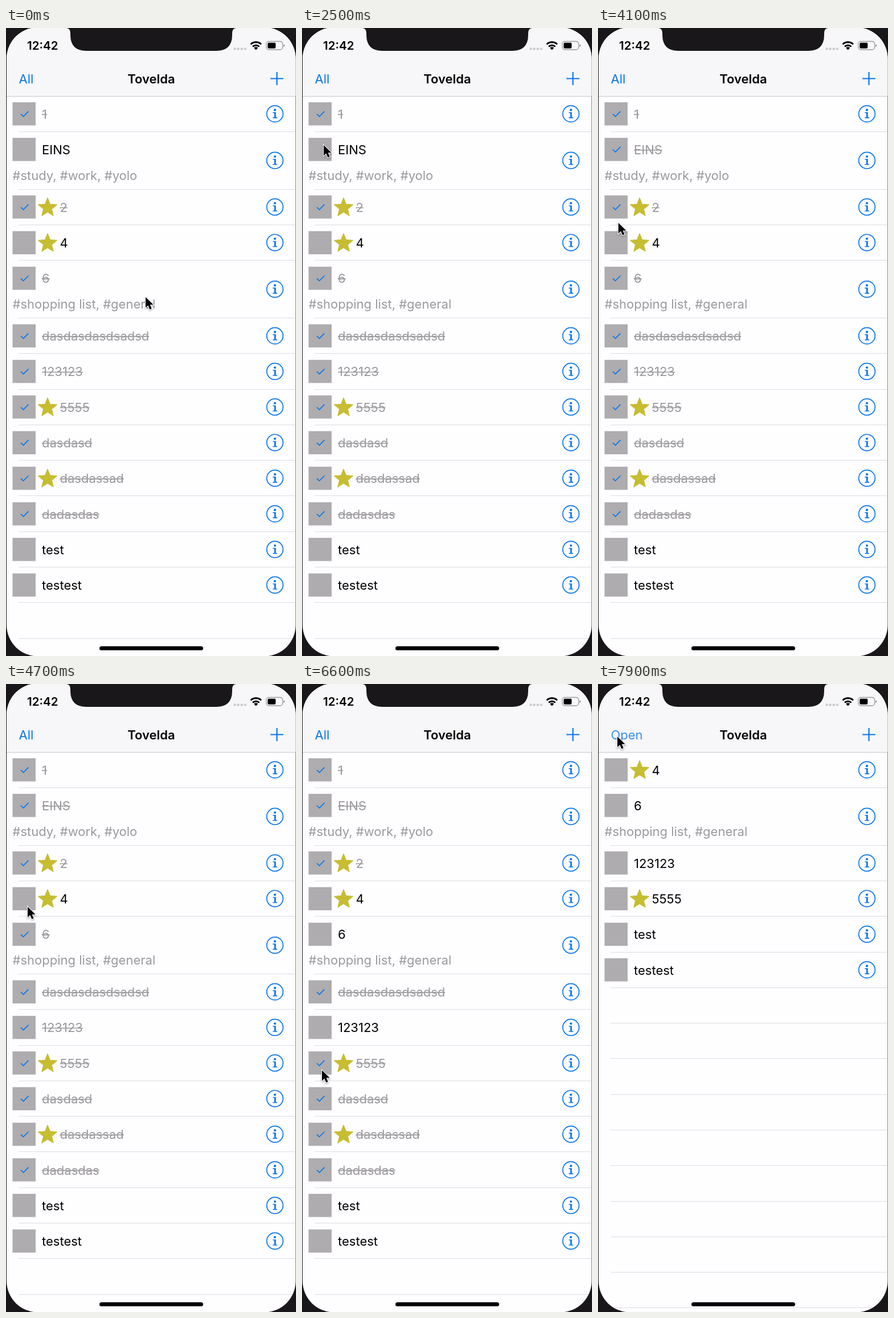
These frames come from a looping animation (509 by 1099 pixels, 8000 ms). An HTML page with a canvas:

```html
<!DOCTYPE html>
<html lang="en">
<head>
<meta charset="utf-8">
<title>To-do list</title>
<style>
html, body { margin: 0; width: 100%; height: 100%; overflow: hidden; background: #19171a; }
canvas { display: block; }
</style>
</head>
<body>
<canvas id="stage" width="509" height="1099"></canvas>
<script>
const ctx = document.getElementById('stage').getContext('2d');
const LOOP = 8000, STEP = 100, FILTER_AT = 7700;
const BLUE = '#0a77ea', GREY = '#9b999c', DARK = '#19171a', LINE = '#dedde0';
const ROW = 62.3, TAGGED_ROW = 100.8, LIST_TOP = 119;

// "toggle" is the moment when the row's check box is tapped.
const items = [
  { text: '1', done: true },
  { text: 'EINS', tags: '#study, #work, #yolo', toggle: 2800 },
  { text: '2', done: true, star: true },
  { text: '4', star: true },
  { text: '6', done: true, tags: '#shopping list, #general', toggle: 5400 },
  { text: 'dasdasdasdsadsd', done: true },
  { text: '123123', done: true, toggle: 6100 },
  { text: '5555', done: true, star: true, toggle: 6700 },
  { text: 'dasdasd', done: true },
  { text: 'dasdassad', done: true, star: true },
  { text: 'dadasdas', done: true },
  { text: 'test' },
  { text: 'testest' }
];

// Pointer stops: time, x, y
const stops = [
  [0, 244, 469], [200, 244, 469], [1200, 95, 207], [1700, 95, 207], [2300, 37, 203],
  [2900, 37, 203], [3400, 34, 322], [3900, 34, 322], [4500, 37, 388], [4700, 37, 388],
  [5200, 35, 447], [5500, 35, 447], [6000, 34, 612], [6200, 34, 612], [6500, 34, 674],
  [6800, 34, 674], [7400, 33, 90], [8000, 33, 90]
];

function pointerAt(t) {
  const i = stops.findIndex(s => s[0] > t);
  const [t0, x0, y0] = stops[i - 1], [t1, x1, y1] = stops[i];
  const p = (t - t0) / (t1 - t0), e = p * p * (3 - 2 * p);
  return [x0 + (x1 - x0) * e, y0 + (y1 - y0) * e];
}

function label(text, x, y, color, { size = 22, weight = 400, align = 'left' } = {}) {
  ctx.font = `${weight} ${size}px Inter, sans-serif`;
  ctx.textAlign = align;
  ctx.fillStyle = color;
  ctx.fillText(text, x, y);
  return ctx.measureText(text).width;
}

function box(x, y, w, h, color, radius = 0) {
  ctx.fillStyle = color;
  ctx.beginPath();
  ctx.roundRect(x, y, w, h, radius);
  ctx.fill();
}

function disc(x, y, r, color) {
  box(x - r, y - r, 2 * r, 2 * r, color, r);
}

function stroke(path, color, width) {
  ctx.strokeStyle = color;
  ctx.lineWidth = width;
  ctx.stroke(new Path2D(path));
}

function fill(path, color) {
  ctx.fillStyle = color;
  ctx.fill(new Path2D(path));
}

function star(x, y) {
  ctx.beginPath();
  for (let i = 0; i < 10; i++) {
    const r = i % 2 ? 7.6 : 17.2, a = i * Math.PI / 5;
    ctx.lineTo(x + r * Math.sin(a), y - r * Math.cos(a));
  }
  ctx.closePath();
  ctx.fillStyle = ctx.strokeStyle = '#c6bd31';
  ctx.lineWidth = 1.2;
  ctx.lineJoin = 'round';
  ctx.fill();
  ctx.stroke();
}

function info(x, y) {
  ctx.beginPath();
  ctx.arc(x, y, 14.3, 0, 2 * Math.PI);
  ctx.strokeStyle = BLUE;
  ctx.lineWidth = 1.7;
  ctx.stroke();
  disc(x, y - 6.7, 2.1, BLUE);
  fill(`M${x - 3.6} ${y - 2.8}h5.3v9h2.3v1.6h-7.7v-1.6h2.5v-7.4h-2.4z`, BLUE);
}

function drawRow(item, done, y) {
  const height = item.tags ? TAGGED_ROW : ROW;
  const x = item.star ? 94.5 : 63;
  box(11.5, y + 11, 40.5, 40.5, '#aeacae');
  if (done) stroke(`M26 ${y + 31.4}l4.4 4.4l9 -9`, BLUE, 1.7);
  if (item.star) star(73, y + 32.4);
  const width = label(item.text, x, y + 39.6, done ? GREY : '#000');
  if (done) box(x, y + 31.6, width, 1.6, GREY);
  if (item.tags) label(item.tags, 11.5, y + 84.3, GREY);
  info(472, y + height / 2);
  return y + height;
}

function drawList(t) {
  let y = LIST_TOP;
  const separator = () => box(22, Math.floor(y), 487, 1, LINE);
  for (const item of items) {
    const done = !!item.done !== (t >= item.toggle);
    if (t >= FILTER_AT && done) continue;
    y = drawRow(item, done, y);
    separator();
  }
  while ((y += ROW) < 1099) separator();
}

function drawBars(t) {
  box(0, 0, 509, 119, '#f7f6f8');
  box(0, 119, 509, 1, '#c5c4c7');
  const filtered = t >= FILTER_AT;
  label(filtered ? 'Open' : 'All', 22.5, 97, filtered ? '#3c91ea' : BLUE);
  label('Tovelda', 255, 97, '#000', { weight: 600, align: 'center' });
  stroke('M464 88.5h23M475.5 77v23', BLUE, 2.2);

  label('12:42', 37, 38, '#000', { size: 20.5, weight: 600 });
  for (let i = 0; i < 4; i++) disc(401.5 + i * 6.1, 36.5, 2.2, '#c9c8cb');
  stroke('M429.5 28.5a13.5 13.5 0 0 1 18.5 0M433 32.5a8.5 8.5 0 0 1 11.5 0', '#000', 3);
  fill('M438.7 38.5l-3.6 -3.7a5.2 5.2 0 0 1 7.2 0z', '#000');
  ctx.beginPath();
  ctx.roundRect(457, 23.5, 28.5, 14.5, 4);
  ctx.strokeStyle = '#99989b';
  ctx.lineWidth = 1.3;
  ctx.stroke();
  box(459.3, 25.8, 14, 10, '#000', 2);
  fill('M487 28.3q2.2 .8 2.2 2.5t-2.2 2.5z', '#99989b');
}

function drawPointer(x, y) {
  const arrow = `M${x + 1} ${y + 2}v18.5l4.3 -4l3.1 7l3.3 -1.5l-3 -6.7h6z`;
  ctx.save();
  ctx.shadowColor = '#0005';
  ctx.shadowBlur = 3;
  ctx.shadowOffsetY = 1.5;
  stroke(arrow, '#fff', 2.2);
  ctx.restore();
  fill(arrow, '#000');
}

function draw(t) {
  box(0, 0, 509, 1099, DARK);
  ctx.save();
  ctx.beginPath();
  ctx.roundRect(1, -1, 507.5, 1100.5, 55);
  ctx.clip();
  box(0, 0, 509, 1099, '#fefdff');
  drawList(t);
  drawBars(t);
  fill('M105 0q8 0 8 9v3q0 28 28 28h228q28 0 28 -28v-3q0 -9 8 -9z', DARK);
  box(164, 1082, 182, 7, '#000', 3.5);
  ctx.restore();
  drawPointer(...pointerAt(t));
}

function tick(now) {
  draw(Math.floor(now % LOOP / STEP) * STEP);
  requestAnimationFrame(tick);
}
requestAnimationFrame(tick);
</script>
</body>
</html>
```
